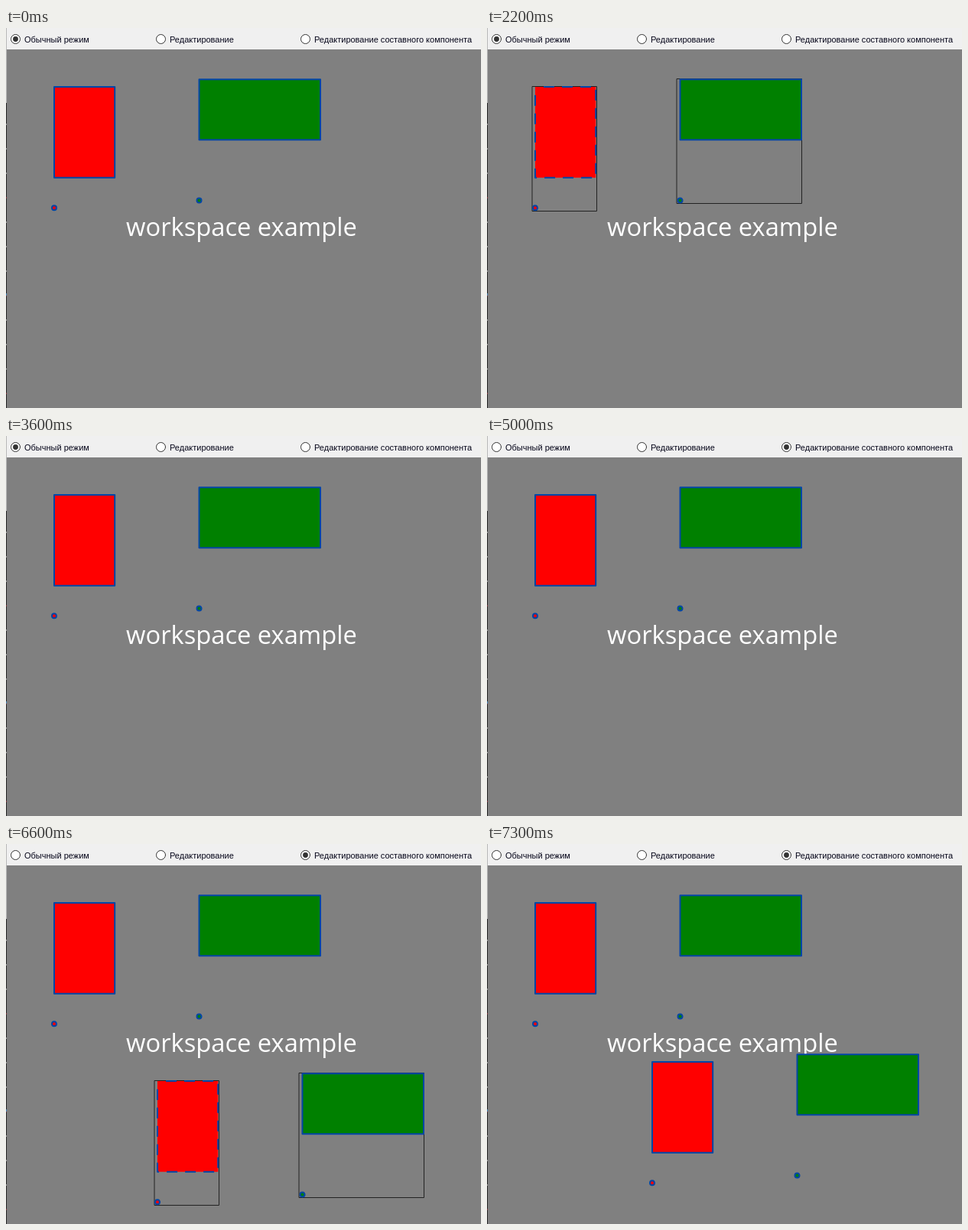
An HTML page with a canvas that plays this animation: 621x497 px, repeating every 8000 ms.

```html
<!DOCTYPE html>
<html lang="ru">
<head>
<meta charset="utf-8">
<title>workspace example</title>
<style>
html, body { margin: 0; width: 100%; height: 100%; overflow: hidden; background: #808080; }
canvas { display: block; }
</style>
</head>
<body>
<canvas id="stage" width="621" height="497"></canvas>
<script>
const ctx = document.getElementById('stage').getContext('2d');
const LOOP = 8000, BLUE = '#0346a6', DARK = '#333';
const RADIOS = [
  [12.5, 'Обычный режим'],
  [202.5, 'Редактирование'],
  [391.5, 'Редактирование составного компонента']
];
const RED = { fill: '#f00', body: [63, 77, 79.2, 118.7], dot: [63, 235.3], box: [59.5, 76.5, 84, 163] };
const GREEN = { fill: '#008000', body: [252.5, 67.2, 158.5, 79.1], dot: [252.5, 225.5], box: [248.5, 66.5, 163, 163] };

// Positions of the dragged copy: [time, dx, dy]
const DRAG = [
  [5900, 106, 256], [6500, 115, 250], [6600, 135, 233],
  [6700, 146, 219], [6800, 151, 211], [6900, 153, 208]
];
// Dash phase of the hovered shape: [time, phase]
const HOVER = [[2100, 0], [2200, 12], [2500, 0], [2900, 12], [3300, 0]];

const within = (t, a, b) => t >= a && t < b;
const latest = (list, t) => list.filter(k => k[0] <= t).pop();

function rect(color, x, y, w, h) {
  ctx.fillStyle = color;
  ctx.fillRect(x, y, w, h);
}

function disc(x, y, r) {
  ctx.beginPath();
  ctx.arc(x, y, r, 0, Math.PI * 2);
}

function label(text, x, y, font, color) {
  ctx.font = font;
  ctx.fillStyle = color;
  ctx.fillText(text, x, y);
}

function radio([x, text], amount) {
  disc(x, 14.5, 6);
  ctx.fillStyle = '#fff';
  ctx.fill();
  ctx.strokeStyle = DARK;
  ctx.lineWidth = 1;
  ctx.stroke();
  ctx.globalAlpha = amount;
  disc(x, 14.5, 3.4);
  ctx.fillStyle = DARK;
  ctx.fill();
  ctx.globalAlpha = 1;
  label(text, x + 11.5, 19, '11px "Liberation Sans", Arial, sans-serif', '#06061a');
}

function edge() {
  rect('#b8b8b8', 0, 0, 1, 98);
  rect('#2b2b2b', 0, 98, 1, 399);
  for (let y = 125, i = 0; y < 497; y += 32, i++) {
    rect(i % 4 === 3 ? '#7a3038' : '#8c8c8c', 0, y, 1, 2);
  }
  rect('#3f7fb0', 0, 347, 1, 3);
}

function shape(s, boxed, phase = null) {
  if (boxed) {
    ctx.strokeStyle = '#222';
    ctx.lineWidth = 1;
    ctx.strokeRect(...s.box);
  }
  ctx.fillStyle = s.fill;
  ctx.strokeStyle = BLUE;
  ctx.lineWidth = 2;
  ctx.lineJoin = 'round';
  ctx.fillRect(...s.body);
  if (phase !== null) {
    ctx.lineCap = 'square';
    ctx.setLineDash([12, 12]);
    ctx.lineDashOffset = phase;
  }
  ctx.strokeRect(...s.body);
  ctx.setLineDash([]);
  disc(...s.dot, 3);
  ctx.fill();
  ctx.stroke();
}

function draw(t) {
  rect('#808080', 0, 0, 621, 497);
  rect('#f0f0f0', 0, 0, 621, 28);
  edge();

  const fade = Math.min(1, Math.max(0, Math.floor((t - 4300) / 100) / 7));
  RADIOS.forEach((r, i) => radio(r, [1 - fade, 0, fade][i]));
  label('workspace example', 157, 272, '32.7px "Open Sans", "Noto Sans", sans-serif', '#fff');

  const hover = t < 3600 ? latest(HOVER, t) : null;
  shape(RED, within(t, 2000, 3600), hover ? hover[1] : null);
  shape(GREEN, within(t, 1400, 3600));

  const at = latest(DRAG, t);
  if (!at) return;
  ctx.save();
  ctx.translate(at[1], at[2]);
  shape(RED, t < 7300, within(t, 6500, 7200) ? 12 : null);
  shape(GREEN, t < 7300);
  ctx.restore();
}

function tick() {
  draw(performance.now() % LOOP);
  requestAnimationFrame(tick);
}
tick();
</script>
</body>
</html>
```
